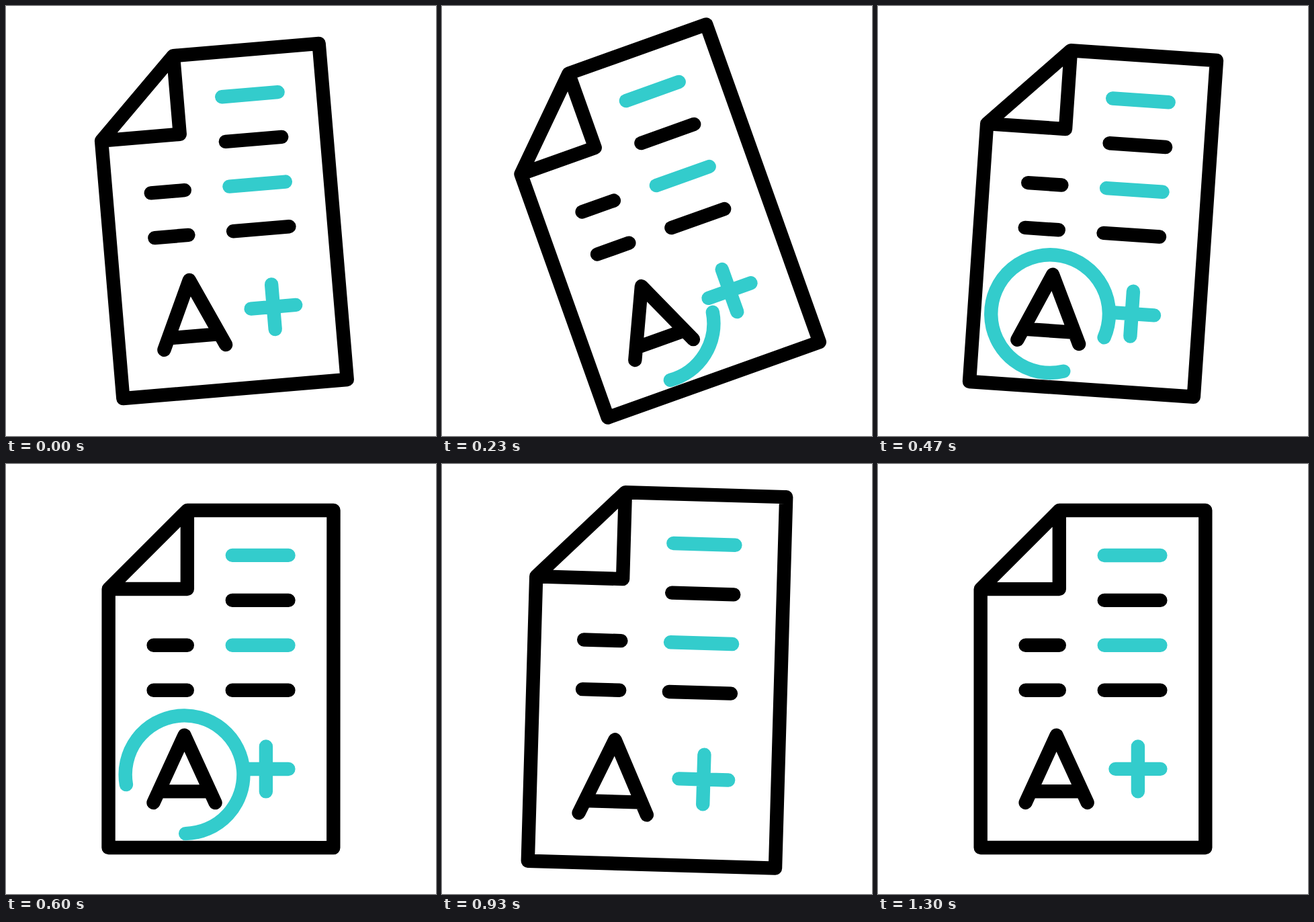
These frames come from a looping animation (640 by 640 pixels, 1.67 s). An HTML page:

```html
<!DOCTYPE html>
<html lang="en">
<head>
<meta charset="utf-8">
<title>Graded paper</title>
<style>
  html, body { margin: 0; height: 100%; overflow: hidden; background: #fff; }
  svg { display: block; width: 100vw; height: 100vh; }
  path { fill: none; stroke: #000; stroke-width: 20.4px; stroke-linecap: round;
         stroke-linejoin: round; vector-effect: non-scaling-stroke; }
  .accent { stroke: #33cccc; }
</style>
</head>
<body>
<svg viewBox="0 0 640 640">
  <g id="paper">
    <path d="M-10-8L-3-15H10V15H-10ZM-3-15V-8H-10"/>
    <path d="M1-7H6M1 1H6M-6-3H-3M-6 1H-3"/>
    <path class="accent" d="M1-11H6M1-3H6"/>
    <path d="M-6 11L-3.25 5L-.5 11M-5.54 10H-.96"/>
    <path class="accent" d="M2 8H6M4 6V10"/>
    <path class="accent" id="ring"/>
  </g>
</svg>
<script>
const LOOP = 1670, FPS = 30, LAST = 39, UNIT = 16.73;
const paper = document.getElementById('paper');
const ring = document.getElementById('ring');

// Keys are [frame, value] pairs
const swing = [[-3.1, 0], [6.4, -20], [14, 3.9], [21.9, -3.7], [29.6, 2.3], [34.5, 0]];
const zoom = [[17.5, 1], [28, 1.101], [39, 1]];

const clamp = x => Math.min(1, Math.max(0, x));
const sine = x => (1 - Math.cos(Math.PI * x)) / 2;

function track(keys, f) {
  let value = keys[0][1];
  for (let i = 1; i < keys.length; i++) {
    const [f0, v0] = keys[i - 1], [f1, v1] = keys[i];
    if (f >= f0) value = v0 + (v1 - v0) * sine(clamp((f - f0) / (f1 - f0)));
  }
  return value;
}

// cubic-bezier(.25, .1, .25, 1), solved by bisection
function ease(x) {
  const bez = (a, b, u) => 3 * a * u * (1 - u) ** 2 + 3 * b * u * u * (1 - u) + u ** 3;
  let lo = 0, hi = 1;
  for (let i = 0; i < 24; i++) {
    const mid = (lo + hi) / 2;
    if (bez(.25, .25, mid) < x) lo = mid; else hi = mid;
  }
  return bez(.1, 1, lo);
}

function ringPoint(deg) {
  const a = deg * Math.PI / 180;
  return `${-3.25 + 5.25 * Math.cos(a)} ${8.5 + 5.25 * Math.sin(a)}`;
}

function ringPath(f) {
  const head = 5 + 480 * ease(clamp((f - 3.8) / 21.3));
  const tail = 485 - 480 * ease(clamp((26.4 - f) / 22));
  if (head - tail < 1) return '';
  const large = head - tail > 180 ? 1 : 0;
  return `M${ringPoint(tail)}A5.25 5.25 0 ${large} 1 ${ringPoint(head)}`;
}

function draw(now) {
  const f = Math.min(LAST, Math.floor((now % LOOP + 3.4) * FPS / 1000));
  paper.setAttribute('transform',
    `translate(320 320) rotate(${track(swing, f)}) scale(${UNIT * track(zoom, f)})`);
  ring.setAttribute('d', ringPath(f));
}

function tick() {
  draw(performance.now());
  requestAnimationFrame(tick);
}
tick();
</script>
</body>
</html>
```
